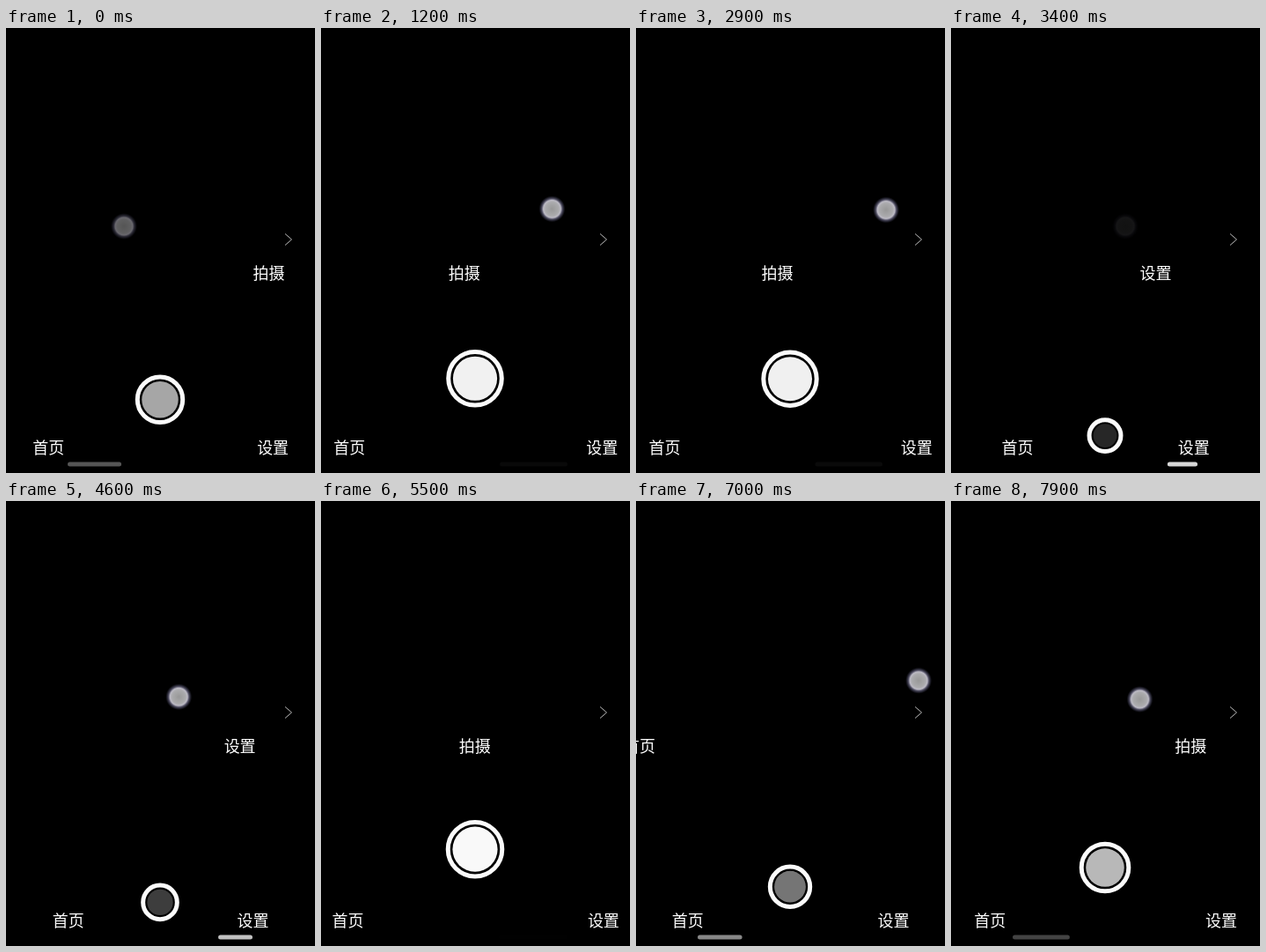
Recreate the animation shown at these times as an HTML page. Size 351 px wide and 505 px high, loop 8000 ms.

```html
<!DOCTYPE html>
<html lang="zh-CN">
<head>
<meta charset="utf-8">
<style>
html, body { margin: 0; width: 100%; height: 100%; overflow: hidden; background: #000; }
svg { display: block; width: 351px; height: 505px; }
text { font: 18px "Noto Sans CJK SC", "Noto Sans CJK", sans-serif; fill: #fff; text-anchor: middle; }
</style>
</head>
<body>
<svg viewBox="0 0 351 505">
  <defs>
    <radialGradient id="glow">
      <stop offset="0" stop-color="#989898"/>
      <stop offset=".5" stop-color="#aaaaac"/>
      <stop offset=".66" stop-color="#bcbac4"/>
      <stop offset=".77" stop-color="#565468"/>
      <stop offset="1" stop-color="#303048" stop-opacity="0"/>
    </radialGradient>
  </defs>
  <path d="M317 233.5L324.5 240L317 246.5" fill="none" stroke="#b4b4b4"/>
  <text id="title" y="284.5"></text>
  <circle id="ring" cx="175" fill="none" stroke="#fbfbfb" stroke-width="5"/>
  <circle id="disc" cx="175" fill="#fafafa"/>
  <text id="home" y="483">首页</text>
  <text id="settings" y="483">设置</text>
  <rect id="bar" y="492.5" height="5" rx="2.5" fill="#fff"/>
  <circle id="touch" r="15" fill="url(#glow)"/>
</svg>
<script>
const LOOP = 8000, STEP = 100, WIDTH = 351;
const SPACING = 368;   // distance between page titles
const REACH = 393;     // finger travel for one whole page
const SETTLE = 0.0068, FADE = 260;
const titles = ['首页', '拍摄', '设置'];

// The finger moves from x0 to x1, then the page settles from where it was dragged to `rest`.
const drags = [
  { start: -500, end: -115, x0: 240, x1: 134, from: 0, rest: 1 },
  { start: 1135, end: 1750, x0: 276, x1: 148, from: 1, rest: 1 },
  { start: 2850, end: 3170, x0: 300, x1: 198, from: 1, rest: 2 },
  { start: 4250, end: 4650, x0: 100, x1: 210, from: 2, rest: 1 },
  { start: 5950, end: 6600, x0: 111, x1: 325, from: 1, rest: 0, y1: 202 },
  { start: 6700, end: 7900, x0: 325, x1: 214.5, from: 0.456, rest: 1, ease: 2.4 }
];

const $ = id => document.getElementById(id);
const set = (id, attrs) => {
  for (const name in attrs) $(id).setAttribute(name, attrs[name]);
};

function stateAt(t) {
  const { start, end, x0, x1, from, rest, y1 = 225, ease = 1 } =
    drags.filter(d => d.start <= t).pop();
  const k = Math.min(1, (t - start) / (end - start)) ** ease;
  const late = Math.max(0, t - end);
  const x = x0 + (x1 - x0) * k, y = 203 + (y1 - 203) * k;
  const dragged = from - (x - x0) / REACH;
  const page = late ? rest + (dragged - rest) * Math.exp(-SETTLE * late) : dragged;
  return { x, y, page, alpha: Math.max(0, 1 - late / FADE) };
}

function draw(t) {
  const { x, y, page, alpha } = stateAt(t);
  const nearest = Math.round(page), away = Math.abs(page - 1);
  const cy = 395 + 80 * away;
  const homeX = 30.3 + 53.5 * away, width = 78.7 - 52.7 * away;

  $('title').textContent = titles[nearest];
  set('title', { x: 175.5 + (nearest - page) * SPACING });
  set('ring', { cy, r: 30.8 - 15.2 * away });
  set('disc', { cy, r: 25.6 - 14.5 * away, opacity: 1 - away });
  set('home', { x: homeX });
  set('settings', { x: WIDTH + 0.3 - homeX });
  set('bar', { x: page < 1 ? 70 : 280 - width, width, opacity: away });
  set('touch', { cx: x, cy: y, opacity: alpha });
}

function frame() {
  const t = performance.now() % LOOP;
  draw(Math.floor(t / STEP) * STEP);
  requestAnimationFrame(frame);
}
frame();
</script>
</body>
</html>
```
